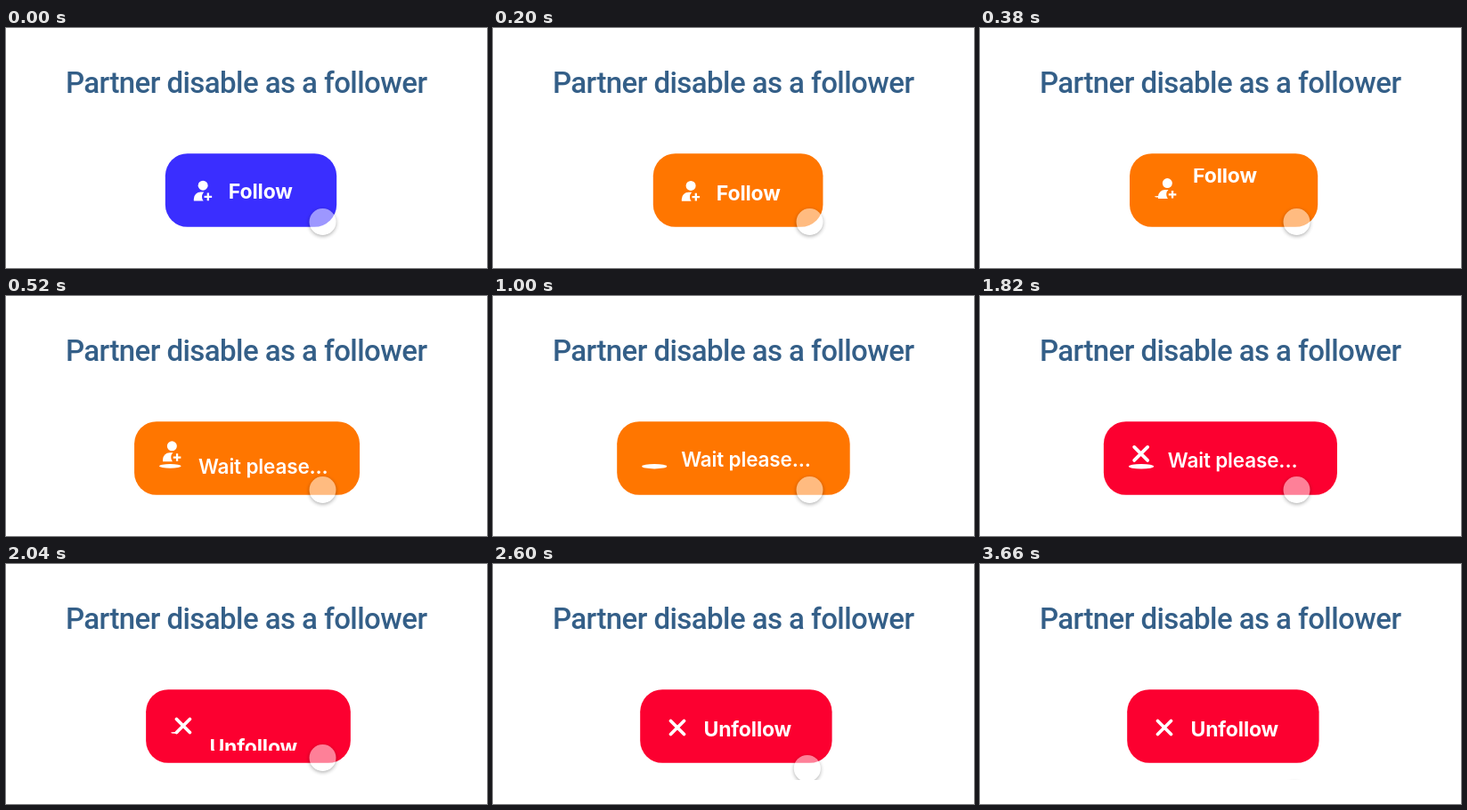
Recreate the animation shown at these times as an HTML page. Size 540 by 270 pixels, loop 3700 ms.

```html
<!DOCTYPE html>
<html lang="en">
<head>
<meta charset="utf-8">
<title>Follow button</title>
<style>
  html, body { margin: 0; width: 100%; height: 100%; overflow: hidden; background: #fff; }
  #stage { position: relative; width: 540px; height: 243px; overflow: hidden; }
  svg { position: absolute; left: 0; top: 0; display: block; }
  #title { font: 500 33px Roboto, sans-serif; letter-spacing: -.58px; fill: #345f88; }
  .label { font: 700 23px Inter, sans-serif; letter-spacing: -.15px; fill: #fff; }
  .label.light { font-weight: 600; font-size: 22.5px; }
  #tap {
    position: absolute; left: -15px; top: -15px; width: 30px; height: 30px;
    border-radius: 50%; background: rgba(255, 255, 255, .5);
    box-shadow: 0 1.5px 4px rgba(0, 0, 0, .32);
  }
</style>
</head>
<body>
<div id="stage">
  <svg width="540" height="243" viewBox="0 0 540 243">
    <defs>
      <clipPath id="labelClip"><rect x="60" y="158" width="300" height="52"/></clipPath>
      <clipPath id="holeClip"><rect x="10" y="142" width="60" height="50"/></clipPath>
    </defs>
    <text id="title" x="269.7" y="73" text-anchor="middle">Partner disable as a follower</text>
    <rect id="button" y="141.2" height="82.6" rx="25"/>
    <g id="content">
      <ellipse id="hole" fill="#fff"/>
      <g id="personBox">
        <g id="person" fill="#fff">
          <circle cx="42.3" cy="177.2" r="5.5"/>
          <path d="M32 194.5v-2.3a7.7 7.7 0 0 1 7.7-7.7h3.8c-1.6 1.5-2.3 3.1-2.3 5.2 0 1.9.6 3.5 1.7 4.8z"/>
          <path d="M48 185.6v8.6M43.7 189.9h8.6" stroke="#fff" stroke-width="2.3"/>
        </g>
      </g>
      <g id="crossBox" clip-path="url(#holeClip)">
        <path id="cross" d="M34.3 176.5l15 15m0-15l-15 15" fill="none"
              stroke="#fff" stroke-width="3.8" stroke-linecap="round"/>
      </g>
      <g clip-path="url(#labelClip)">
        <text class="label" id="follow" x="71" y="192.3">Follow</text>
        <text class="label light" id="wait" x="72" y="192">Wait please...</text>
        <text class="label" id="unfollow" x="71.3" y="193.5">Unfollow</text>
      </g>
    </g>
  </svg>
  <div id="tap"></div>
</div>
<script>
const LOOP = 3700, ROW = 67;
const $ = id => document.getElementById(id);
const lerp = (a, b, k) => a + (b - a) * k;
const move = (id, y) => $(id).setAttribute('transform', `translate(0 ${y})`);
const setAll = (id, attrs) => {
  for (const name in attrs) $(id).setAttribute(name, attrs[name]);
};
const clip = (id, on) => setAll(id, { 'clip-path': on ? 'url(#holeClip)' : 'none' });

// Cubic bezier easing, solved by bisection
function bezier(x1, y1, x2, y2) {
  const at = (a, b, t) => 3 * (1 - t) ** 2 * t * a + 3 * (1 - t) * t * t * b + t ** 3;
  return p => {
    if (p <= 0) return 0;
    if (p >= 1) return 1;
    let lo = 0, hi = 1;
    for (let i = 0; i < 24; i++) {
      const mid = (lo + hi) / 2;
      if (at(x1, x2, mid) < p) lo = mid; else hi = mid;
    }
    return at(y1, y2, lo);
  };
}

const step = (start, end, ease) => t => ease((t - start) / (end - start));
const toWait = step(0, 540, bezier(.3, -.12, .7, -.1));
const sink = step(550, 1060, bezier(.4, -.2, .7, 1));
const rise = step(1110, 1640, bezier(.3, 0, .3, 1));
const toDone = step(1640, 2160, bezier(.6, -.35, .72, .95));
const leave = step(2370, 2900, bezier(.52, 0, .62, .95));
const drift = step(2370, 2600, bezier(.4, 0, .6, 1));

function draw(t) {
  const a = toWait(t), b = toDone(t), s = sink(t), r = rise(t), out = leave(t);

  const left = lerp(lerp(178.8, 139.2, a), 165.2, b);
  const right = lerp(lerp(371.2, 400.7, a), 380.6, b);
  const fill = t < 20 ? '#3a2eff' : t < 1660 ? '#ff7600' : '#fc0030';
  setAll('button', { x: left, width: right - left, fill });
  $('content').setAttribute('transform', `translate(${left} 0)`);

  move('follow', -ROW * a);
  move('wait', ROW * (1 - a - b));
  move('unfollow', ROW * (1 - b));

  const k = Math.max(0, a * (1 - b));
  setAll('hole', { cx: 28 + 14 * k, cy: 189 + 2.7 * k, rx: 14 * k, ry: 2.7 * k });

  // The person drops into the hole, then the cross comes out of it
  clip('personBox', t > 540);
  move('person', lerp(-9.5 * a, 26, s));
  $('person').style.display = t < 1100 ? '' : 'none';
  clip('crossBox', t < 1640);
  move('cross', lerp(lerp(26, -6.5, r), 0, b));
  $('cross').style.display = t > 1100 ? '' : 'none';

  const x = lerp(355.5, 352.8, drift(t)), y = lerp(218, 259, out);
  $('tap').style.transform = `translate(${x}px, ${y}px)`;
}

const begin = performance.now();
function tick() {
  draw((performance.now() - begin) % LOOP);
  requestAnimationFrame(tick);
}
draw(0);
requestAnimationFrame(tick);
</script>
</body>
</html>
```
